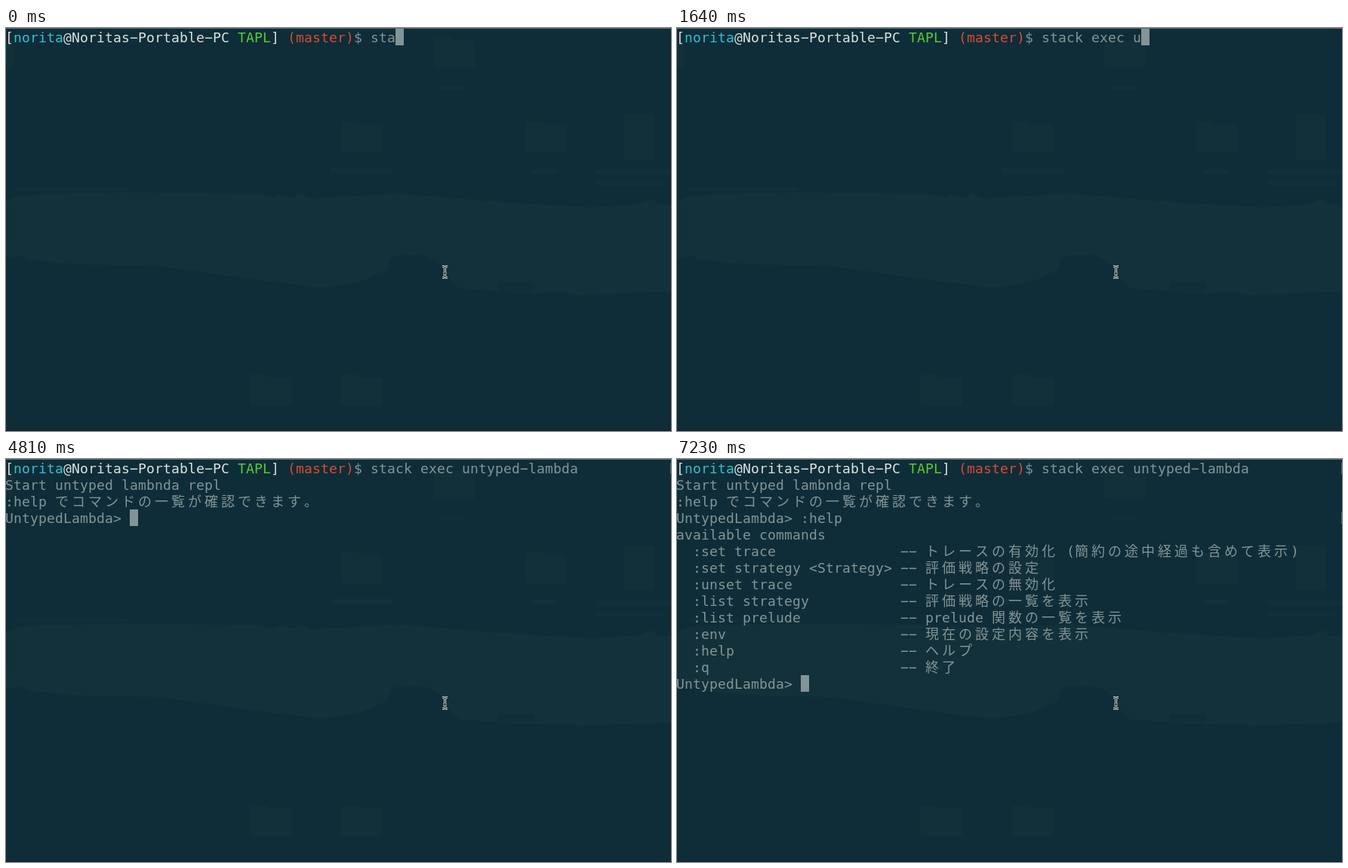
Recreate the animation shown at these times as an HTML page with a canvas. Size 881 px wide and 535 px high, loop 8 s.

```html
<!DOCTYPE html>
<html lang="ja">
<head>
<meta charset="utf-8">
<title>Lambda REPL session</title>
<style>
html, body { margin: 0; width: 100%; height: 100%; overflow: hidden; background: #0e2d38; }
canvas { display: block; }
</style>
</head>
<body>
<canvas id="stage" width="881" height="535"></canvas>
<script>
const ctx = document.getElementById('stage').getContext('2d');
const LOOP = 8000, CELL = 11, LINE = 22;
const GRAY = '#839496', WHITE = '#dce0de';

const prompt = [
  ['[', WHITE], ['norita', '#35bfce'], ['@Noritas-Portable-PC ', WHITE],
  ['TAPL', '#5cc92f'], ['] ', WHITE], ['(master)', '#dc4a32'], ['$ ', GRAY]
];
const promptLength = 44;
const command = 'stack exec untyped-lambda ';
const banner = ['Start untyped lambnda repl', ':help でコマンドの一覧が確認できます。'];
const repl = 'UntypedLambda> ';
const commands = [
  ['set trace', 'トレースの有効化 (簡約の途中経過も含めて表示)'],
  ['set strategy <Strategy>', '評価戦略の設定'],
  ['unset trace', 'トレースの無効化'],
  ['list strategy', '評価戦略の一覧を表示'],
  ['list prelude', 'prelude 関数の一覧を表示'],
  ['env', '現在の設定内容を表示'],
  ['help', 'ヘルプ'],
  ['q', '終了']
];
const help = ['available commands',
  ...commands.map(([name, about]) => ('  :' + name).padEnd(27) + '-- ' + about)];

// Key press times; the last part of the command arrives by completion
const commandKeys = [140, 290, 410, 830, 1010, 1130, 1370, 1490, 1640, 2390, 2600, 2780];
const helpKeys = [6130, 6420, 6540, 6660, 6810];
const pressed = (keys, t) => keys.filter(k => t >= k).length;

function fillBoxes(color, boxes) {
  ctx.fillStyle = color;
  for (const box of boxes) ctx.fillRect(...box);
}

function folder(x, y) {
  ctx.beginPath();
  ctx.roundRect(x, y, 24, 10, 3);
  ctx.roundRect(x, y + 4, 55, 37, 2);
  ctx.fill();
}

function drawBackdrop() {
  fillBoxes('#0e2d38', [[0, 0, 881, 535]]);
  ctx.fillStyle = '#12313a';
  ctx.fill(new Path2D(`M0 230L20 222L160 218L340 221L352 225L362 221L382 225L391 219L402 226
    L520 220L600 226L650 231L705 234L775 238L840 234L855 227L866 235L881 235V350L760 354
    L740 351L700 352L600 346L580 324Q574 304 545 301Q512 300 508 308L505 322L490 327
    Q470 342 410 344L330 334L230 320L200 316L100 314L30 308L20 302L0 306Z`));
  ctx.fillStyle = '#11303a';
  for (const [x, y] of [[566, 12], [444, 124], [688, 124], [323, 460], [444, 460]]) folder(x, y);
  fillBoxes('#11303a', [
    [819, 115, 40, 60], [0, 16, 10, 36], [0, 240, 12, 38], [15, 212, 145, 4],
    [575, 77, 34, 5], [430, 186, 82, 7], [697, 187, 34, 6], [782, 188, 99, 6], [782, 203, 90, 6]
  ]);
  ctx.fillStyle = '#0f2e38';
  ctx.beginPath();
  ctx.roundRect(652, 338, 49, 11, 5);
  ctx.fill();
  fillBoxes('#59696f', [[0, 0, 881, 1]]);
  fillBoxes('#0b1d36', [[0, 534, 881, 1]]);
}

// Draws on the character grid and returns the next free column
function write(text, row, col = 0, color = GRAY) {
  ctx.fillStyle = color;
  for (const ch of text) {
    // The terminal face has a long hyphen
    ctx.fillText(ch === '-' ? '\u2212' : ch, col * CELL - 1, row * LINE + 19);
    col += ch > '\u2fff' ? 2 : 1;
  }
  return col;
}

function drawPointer() {
  const beam = new Path2D('M578 316.5Q581.5 316.5 581.5 319V329Q581.5 331.5 578 331.5' +
    'M585 316.5Q581.5 316.5 581.5 319M581.5 329Q581.5 331.5 585 331.5M579.5 325.5H583.5');
  for (const [color, width] of [['#d5dadb', 3], ['#14191b', 1]]) {
    ctx.strokeStyle = color;
    ctx.lineWidth = width;
    ctx.stroke(beam);
  }
}

function drawTerminal(t) {
  ctx.font = '18px "DejaVu Sans Mono", "Noto Sans CJK JP", "Noto Sans CJK", monospace';
  let col = 0, row = 0;
  for (const [text, color] of prompt) col = write(text, 0, col, color);
  const typed = t < 3550 ? 3 + pressed(commandKeys, t) : command.length;
  col = write(command.slice(0, typed), 0, promptLength);
  if (t >= 4330) { row = 1; col = 0; }
  if (t >= 4810) {
    banner.forEach((line, i) => write(line, 1 + i));
    row = 3;
    col = write(repl + ':help'.slice(0, pressed(helpKeys, t)), row);
  }
  if (t >= 7200) { row = 4; col = 0; }
  if (t >= 7230) {
    help.forEach((line, i) => write(line, 4 + i));
    row = 4 + help.length;
    col = write(repl, row);
  }
  fillBoxes('#839496', [[col * CELL - 1, row * LINE + 1, CELL, LINE]]);
  if (t >= 2830) fillBoxes('#53666b', [[880, 5, 1, 15]]);
  if (t >= 7200) fillBoxes('#53666b', [[880, 71, 1, 15]]);
}

function frame() {
  drawBackdrop();
  drawTerminal(performance.now() % LOOP);
  drawPointer();
  requestAnimationFrame(frame);
}
frame();
</script>
</body>
</html>
```
